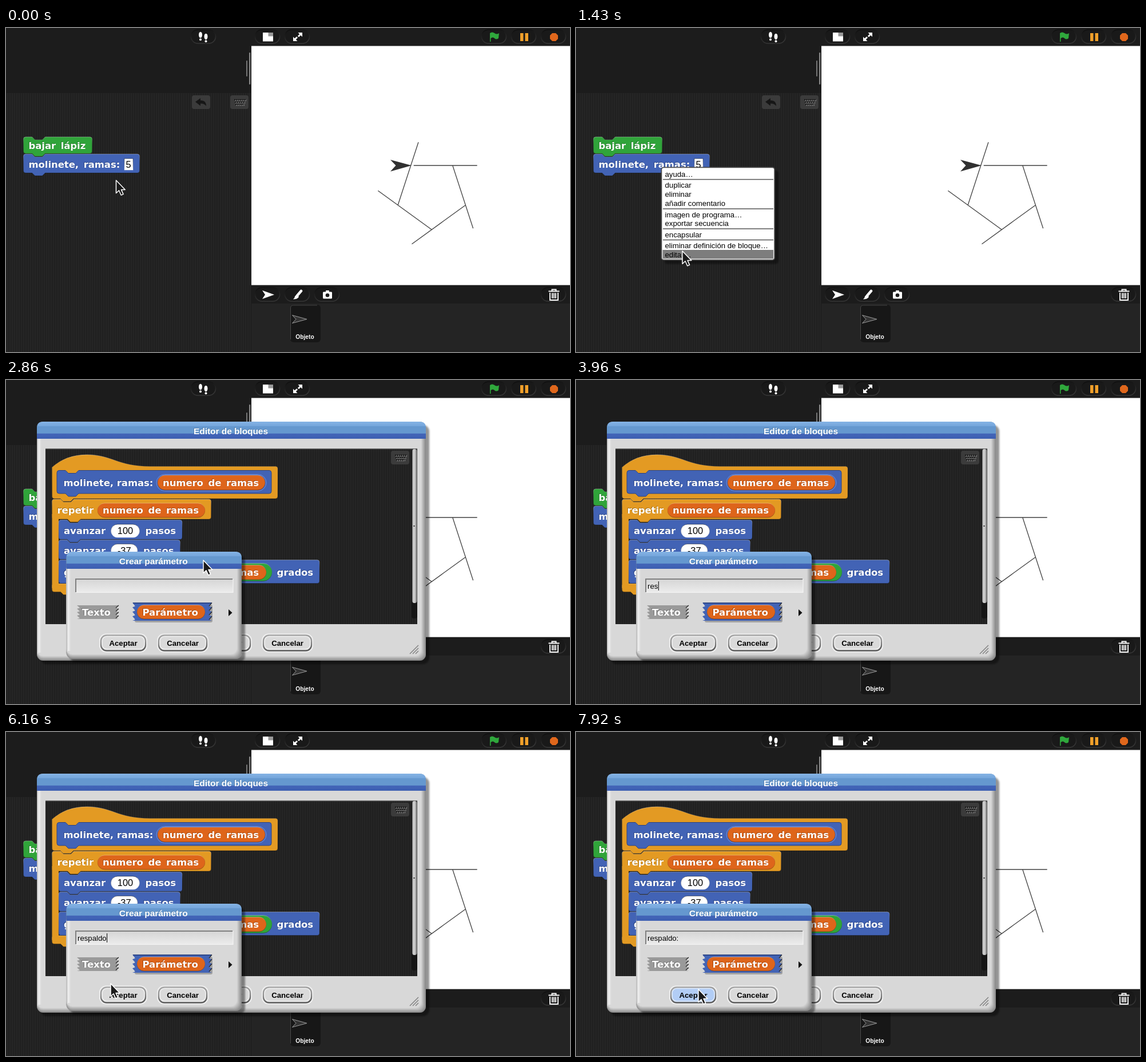
An HTML page for the animation above (8000 ms loop, 986 px wide and 568 px high).

```html
<!DOCTYPE html>
<html lang="es">
<head>
<meta charset="utf-8">
<title>Editor de bloques</title>
<style>
  html, body { margin: 0; width: 100%; height: 100%; overflow: hidden; background: #1c1c1c; }
  svg { display: block; }
  text { white-space: pre; }
  .label { font: bold 16.4px "DejaVu Sans", Verdana, sans-serif; fill: #fff; text-shadow: -1px -1px 0 rgba(0, 0, 0, .25); }
  .wide { word-spacing: 2.9px; }
  .num { font: 16.4px "Liberation Sans", Arial, sans-serif; fill: #000; text-anchor: middle; }
  .menu { font: 13.2px "Liberation Sans", Arial, sans-serif; fill: #000; }
  .button { font: bold 13.2px "Liberation Sans", Arial, sans-serif; fill: #000; text-anchor: middle; }
  .title { font: bold 15.4px "Liberation Sans", Arial, sans-serif; fill: #fff; text-anchor: middle; text-shadow: -1px -1px 0 rgba(0, 0, 0, .15); }
  .tiny { font: bold 10.2px "Liberation Sans", Arial, sans-serif; fill: #fff; text-anchor: middle; }
</style>
</head>
<body>
<svg id="stage" width="986" height="568" viewBox="0 0 986 568"></svg>
<script>
const BLUE = '#4263b5', GREEN = '#30a43a', GOLD = '#e39a23', ORANGE = '#de651b';
const STEP = 110, LOOP = 8000;

const rect = (x, y, w, h, fill, r = 0, more = '') =>
  `<rect x="${x}" y="${y}" width="${w}" height="${h}" rx="${r}" fill="${fill}" ${more}/>`;
const path = (d, fill = 'none', more = '') => `<path d="${d}" fill="${fill}" ${more}/>`;
const line = (d, color, width = 1, more = '') =>
  path(d, 'none', `stroke="${color}" stroke-width="${width}" ${more}`);
const text = (x, y, s, cls, more = '') => `<text x="${x}" y="${y}" class="${cls}" ${more}>${s}</text>`;
const edge = 'stroke="url(#edge)"';

const defs = `<defs>
  <pattern id="stripes" width="4" height="8" patternUnits="userSpaceOnUse">
    <rect width="4" height="8" fill="#252525"/><rect width="2" height="8" fill="#202020"/></pattern>
  <linearGradient id="edge" x2="0" y2="1"><stop stop-color="#fff" stop-opacity=".32"/>
    <stop offset=".5" stop-color="#000" stop-opacity=".08"/><stop offset="1" stop-color="#000" stop-opacity=".35"/></linearGradient>
  <linearGradient id="sunk" x2="0" y2="1"><stop stop-color="#000" stop-opacity=".45"/>
    <stop offset="1" stop-color="#fff" stop-opacity=".35"/></linearGradient>
  <linearGradient id="pill" x2=".25" y2="1"><stop stop-color="#0c0c0c"/>
    <stop offset=".5" stop-color="#202020"/><stop offset="1" stop-color="#363636"/></linearGradient>
  <linearGradient id="bar" x2="0" y2="1"><stop stop-color="#85b3e4"/><stop offset=".25" stop-color="#75a6dc"/>
    <stop offset=".26" stop-color="#6598cf"/><stop offset=".68" stop-color="#6598cf"/>
    <stop offset=".7" stop-color="#4365b8"/><stop offset="1" stop-color="#3d5fb2"/></linearGradient>
  <linearGradient id="rim"><stop stop-color="#b4b4b4"/><stop offset=".4" stop-color="#f0f0f0"/><stop offset="1" stop-color="#d8d8d8"/></linearGradient>
  <linearGradient id="ring" x2=".15" y2="1"><stop stop-color="#a6a6a6"/><stop offset=".5" stop-color="#909090"/>
    <stop offset="1" stop-color="#5c5c5c"/></linearGradient>
  <linearGradient id="field" x2="0" y2="1"><stop stop-color="#d4d4d4"/><stop offset="1" stop-color="#ececec"/></linearGradient>
  <linearGradient id="slider"><stop stop-color="#808080"/><stop offset=".35" stop-color="#dedede"/><stop offset="1" stop-color="#808080"/></linearGradient>
  <filter id="shade" x="-5%" y="-5%" width="112%" height="112%">
    <feDropShadow dx="6" dy="6" stdDeviation="1.6" flood-opacity=".42"/></filter>
</defs>`;

// Puzzle-shaped command block; dent and tab are offsets from the left side.
function blockPath(x, y, w, h, dent = 15, tab = 15) {
  const b = y + h, r = x + w;
  return `M${x} ${y + 4}q0 -4 4 -4H${x + dent}l5 5h13l5 -5H${r - 4}q4 0 4 4V${b - 4}q0 4 -4 4` +
    `H${x + tab + 23}l-5 5h-13l-5 -5H${x + 4}q-4 0 -4 -4Z`;
}
const block = (x, y, w, h, c, dent, tab) => path(blockPath(x, y, w, h, dent, tab), c, edge);
const oval = (x, y, w, h, c, more = edge) => rect(x, y, w, h, c, h / 2, more);
const number = (x, y, w, s) =>
  oval(x, y, w, 23, '#fff', 'stroke="url(#sunk)"') + text(x + w / 2, y + 17.3, s, 'num');
const variable = (x, y, w, h, s = 'numero de ramas') =>
  oval(x, y, w, h, ORANGE) + text(x + 9, y + h / 2 + 5.8, s, 'label wide');

const pillButton = (x, y) => rect(x - 21.5, y - 12, 43, 24, '#191919', 12, 'stroke="url(#pill)" stroke-width="1.6"');

function keyboard(x, y) {
  const row = (dx, dy, w, c) => line(`M${x + dx} ${y + dy}h${w}`, c, 2.4, 'stroke-dasharray="2.4 1.1"');
  const keys = (o, c) => row(-9 + o, -4 + o, 20, c) + row(-8 + o, o, 18, c) + row(-7 + o, 4 + o, 15, c);
  return rect(x - 16, y - 12, 32, 24, '#3b3b3b', 4) + keys(1, '#8c8c8c') + keys(0, '#171717');
}

function toolbar() {
  const foot = (x, y) => `<ellipse cx="${x}" cy="${y}" rx="3" ry="5.2" fill="#fff"/>` + rect(x - 2, y + 6.3, 4, 4, '#fff', 2);
  const gear = [[345, 15], [457, 15], [509, 15], [853, 15], [905, 15], [957, 15],
    [457, 467], [509, 467], [561, 467], [957, 467]].map(p => pillButton(...p)).join('');
  return gear + foot(340, 12) + foot(349.5, 15) +
    rect(449, 8, 18, 15.5, '#fff') + rect(458.5, 8, 8.5, 6.5, '#999') +
    path('M510.500 8H518V15.500L515.300 12.800L512 16L509.900 14L513.200 10.700ZM509.500 23H502V15.500L504.700 18.200L508 15L510.100 17L506.800 20.300Z', '#fff') +
    path('M846 9q4 -3 8 0t8 0l-1 9q-4 3 -7 0t-6.500 0v6h-1.500Z', '#2fa83c') +
    rect(899, 9, 5.5, 14, '#f1a02a') + rect(907.5, 9, 5.5, 14, '#f1a02a') +
    path('M955 9h6l4 4v6l-4 4h-6l-4 -4v-6Z', '#e0671c') +
    path('M448 460L469 467.500L448 475L453 467.500Z', '#fff') +
    line('M510 468L516 461', '#fff', 4.5, 'stroke-linecap="round"') +
    path('M508 467l4 4q-2 5 -10 4.500q3 -2 3 -5Z', '#fff') +
    rect(554, 462.5, 16, 12, '#fff', 1.5) + rect(559, 460, 6, 4, '#fff', 1) +
    '<circle cx="562" cy="468.500" r="3.300" fill="#1a1a1a"/>' +
    line('M948.500 461.500H967.500M954.500 461V458.500H961.500V461M951 464V477H965V464M955 464.500V474M958 464.500V474M961 464.500V474', '#fff', 1.9);
}

// Five branches of a pinwheel, each 116 long, stepping 63% forward.
function pinwheel() {
  let x = 707.7, y = 241, d = '';
  for (let i = 0; i < 5; i++) {
    const a = i * Math.PI * 2 / 5, dx = 116 * Math.cos(a), dy = 116 * Math.sin(a);
    d += `M${i ? x : x + 5} ${y}L${x + dx} ${y + dy}`;
    x += dx * .63;
    y += dy * .63;
  }
  return line(d, '#404040', 1.3) + path('M672 231L709 241L672 251.500L681.500 241Z', '#303030');
}

function desktop() {
  return rect(0, 0, 986, 568, '#1c1c1c') + rect(0, 114, 428, 454, 'url(#stripes)') +
    rect(429, 483, 557, 85, '#242424') + rect(429, 31.5, 557, 419.2, '#fff') +
    rect(425, 43, 2.2, 56, '#858585', 1) + rect(420, 57, 2, 28, '#777', 1) +
    toolbar() + pinwheel() +
    rect(325, 118, 32, 24, '#3b3b3b', 4) +
    path('M331 129.500L340 123V127Q350 126 350 137Q347 132 340 132.500V136.500Z', '#161616') + keyboard(408, 130) +
    rect(497, 485, 53, 66, '#171717', 6) + line('M497.500 546V491q0 -5 5 -5H544', '#484848') +
    path('M500.500 503.500L526 510.500L500.500 517.500L507 510.500Z', '#333', 'stroke="#aaa" stroke-width=".9"') +
    text(522.5, 545, 'Objeto', 'tiny') +
    block(30.5, 191, 120, 29, GREEN) + text(39.5, 212.3, 'bajar lápiz', 'label wide') +
    block(30.5, 221, 203, 33, BLUE) + text(39.5, 245, 'molinete, ramas:', 'label wide') +
    rect(207, 229, 15, 20, '#fff', 0, 'stroke="url(#sunk)"') + text(214, 245, '5', 'num');
}

function dialog(x, y, w, h, name) {
  const r = x + w;
  let bevel = '';
  for (let i = 1; i <= 8; i++) {
    const c = 139 + i * 77 / 8;
    bevel += rect(x, y + 20, w - i, h - 20 - i, `rgb(${c},${c},${c})`, 11);
  }
  return `<g filter="url(#shade)">` + rect(x, y, w, h, '#8b8b8b', 11) + '</g>' + bevel +
    rect(x, y + 28, 8, h - 42, 'url(#rim)') +
    path(`M${x} ${y + 30}V${y + 11}q0 -11 11 -11H${r - 11}q11 0 11 11V${y + 30}Z`, 'url(#bar)') +
    text(x + w / 2 - 1, y + 21.5, name, 'title');
}

function button(x, w, s, id = '') {
  return rect(x, 444.5, w, 33, '#f0f0f0', 12) +
    rect(x + 3, 447.5, w - 6, 27, '#dadada', 10, `stroke="url(#ring)" stroke-width="2.400" ${id && `id="${id}"`}`) +
    rect(x + 5, 449.5, w - 10, 22.5, 'none', 8, 'stroke="#fff" stroke-opacity=".600" stroke-width="1.600"') +
    text(x + w / 2, 465.7, s, 'button');
}

function editor() {
  const hat = 'M80.500 153Q105 131 141 131C185 131 195 151.500 252 151.500H471q4 0 4 4V204q0 4 -4 4H118l-5 5h-13l-5 -5H84.500q-4 0 -4 -4Z';
  const turn = line('M168 333A7.500 7.500 0 1 0 169.500 341', '#fff', 1.8) + path('M162 326L171.500 331.500L162.500 336Z', '#fff');
  const loop = line('M333 368H344Q348 368 348 364', '#fff', 3) + path('M342.500 364.500L349 357.500L355.500 364.500Z', '#fff');
  return dialog(54, 73, 680, 419, 'Editor de bloques') +
    rect(69, 120.5, 650, 307.5, 'url(#stripes)') + line('M69 121H719', '#555') + keyboard(689, 136) +
    rect(709, 122, 10, 296, '#151515', 4) + rect(710, 121, 8.5, 270, 'url(#slider)', 4) +
    rect(712.5, 255, 2, 2, '#333') +
    path(hat, GOLD, edge) +
    path(blockPath(89, 158.5, 375, 40.5), BLUE, 'stroke="#2c4380"') +
    text(100.5, 186, 'molinete, ramas:', 'label') +
    oval(263, 165.5, 192, 29, BLUE, 'stroke="#6f8fdb"') + variable(265, 167, 188, 26) +
    block(80.5, 209, 278, 35, GOLD, 15, 27) + block(80.5, 357, 278, 14.5, GOLD, 27, 15) + rect(80.5, 235, 11.5, 130, GOLD) +
    text(89.5, 234, 'repetir', 'label') + variable(160, 216, 188, 25) +
    block(92, 245.5, 216, 34, BLUE) + text(101, 270, 'avanzar', 'label') + number(183.5, 253, 50, '100') + text(243.5, 270, 'pasos', 'label') +
    block(92, 280.5, 212.5, 34, BLUE) + text(101, 305, 'avanzar', 'label') + number(183.5, 287.5, 46.5, '-37') + text(240, 305, 'pasos', 'label') +
    block(92, 315.5, 456, 41, BLUE) + text(101, 343, 'girar', 'label') + turn +
    oval(177, 321.5, 288, 31, GREEN) + number(187, 325.5, 50, '360') + text(249, 343, '/', 'label') +
    variable(265, 324.5, 190, 25.5) + text(473.5, 343, 'grados', 'label') + loop +
    button(250, 84, 'Aceptar') + button(350, 80, 'Aplicar') + button(447, 90, 'Cancelar') +
    line('M706 480L721 465M711 480L721 470M716 480L721 475', '#7d7d7d', 1.4);
}

// Label fragment with saw-toothed sides.
function fragment(x, y, w, h, c) {
  const n = 4, s = h / n;
  let d = `M${x} ${y}H${x + w}`, teeth = '';
  for (let i = 0; i < n; i++) {
    d += `l-5 ${s * .75}L${x + w} ${y + (i + 1) * s}`;
    teeth += `M${x + w} ${y + i * s}l-5 ${s * .75}`;
  }
  d += `H${x}`;
  for (let i = n; i-- > 0;) d += `L${x + 5} ${y + (i + .75) * s}L${x} ${y + i * s}`;
  return path(d + 'Z', c) + line(teeth, '#222', 1.2);
}

function inputDialog() {
  return dialog(105.5, 301, 306.5, 188, 'Crear parámetro') +
    rect(121, 348, 276, 24.5, 'url(#field)') + line('M122 372V349H396', '#808080', 2) + line('M122 372.500H397V349', '#f4f4f4', 1.2) +
    text(125, 366, '', 'menu', 'id="entry"') + rect(176, 353, 1, 16, '#000', 0, 'id="caret"') +
    fragment(124, 395, 73, 24, '#9a9a9a') + text(133, 412.5, 'Texto', 'label') +
    rect(225, 394, 136, 31, '#000', 3, 'opacity=".250"') + fragment(221, 390.5, 139, 31.5, BLUE) + line('M222 391H359', '#223a78', 1.4) +
    oval(229, 394.5, 119, 24.5, ORANGE) + text(238.5, 412.5, 'Parámetro', 'label') +
    path('M389 402L395.500 408L389 414Z', '#111') +
    button(163, 84, 'Aceptar', 'accept') + button(264, 90, 'Cancelar');
}

const ITEMS = [['ayuda…', 261], ['duplicar', 280], ['eliminar', 296], ['añadir comentario', 312],
  ['imagen de programa…', 332], ['exportar secuencia', 347], ['encapsular', 367],
  ['eliminar definición de bloque…', 386], ['editar…', 402]];

function menu() {
  return `<g filter="url(#shade)">` + rect(148.5, 243.5, 199.5, 164, '#4d4d4d', 5) + '</g>' +
    rect(150.3, 245.3, 195.9, 160.4, '#fff', 3) + rect(151.5, 389, 193.5, 15.5, '#7d7d7d', 0, 'id="hover"') +
    line('M152 265.500H345M152 317H345M152 352H345M152 371.500H345', '#555', 1.3) +
    ITEMS.map(([s, y]) => text(155.5, y, s, 'menu')).join('');
}

const svg = document.getElementById('stage');
svg.innerHTML = defs + desktop() +
  `<g id="menu">${menu()}</g><g id="editor">${editor()}</g><g id="input">${inputDialog()}</g>` +
  path('M0 0V22.500L5 17.800L8.700 26L12.600 24.400L9 16.400H15.800Z', '#1b1b1b',
    'id="pointer" stroke="#fff" stroke-width="1.500" stroke-linejoin="round"');

const get = id => document.getElementById(id);
const show = (id, on) => get(id).setAttribute('visibility', on ? 'visible' : 'hidden');

// Pointer stops: time, x, y. It rests hidden while keys are typed.
const STOPS = [[0, 192.5, 267], [220, 149, 245], [880, 149, 245], [1430, 186, 391], [1539, 186, 391],
  [1540, 498.5, 281], [1760, 498.5, 281], [2310, 458, 182], [2530, 458, 182], [2860, 345, 316],
  [5500, 345, 316], [6160, 183, 441], [7370, 183, 441], [7810, 214, 451], [8000, 214, 451]];
const HIDDEN = [[3410, 5500], [6600, 7370]];
const WORD = 'respaldo';

function pointerAt(t) {
  const i = Math.max(1, STOPS.findIndex(s => s[0] >= t));
  const [t0, x0, y0] = STOPS[i - 1], [t1, x1, y1] = STOPS[i];
  const k = (t - t0) / (t1 - t0), e = k * k * (3 - 2 * k);
  return [x0 + (x1 - x0) * e, y0 + (y1 - y0) * e];
}

function draw(t) {
  const [x, y] = pointerAt(t);
  const visible = !HIDDEN.some(([a, b]) => t >= a && t < b);
  get('pointer').setAttribute('transform', `translate(${x} ${y})`);
  show('pointer', visible);

  show('menu', t >= 880 && t < 1540);
  const item = ITEMS.find(m => y >= m[1] - 13 && y < m[1] + 3);
  show('hover', t >= 880 && t < 1540 && item);
  if (item) get('hover').setAttribute('y', item[1] - 13);

  const open = t >= 2640;
  show('editor', t >= 1540);
  show('input', open);
  const typed = Math.max(0, Math.min(WORD.length, Math.floor((t - 3410) / 165)));
  const entry = get('entry');
  entry.textContent = WORD.slice(0, typed) + (t >= 6710 ? ':' : '');
  get('caret').setAttribute('x', 125.5 + (typed ? entry.getComputedTextLength() : 0));
  show('caret', open && (t + 150) % 1200 < 600);

  const over = open && visible && x > 163 && x < 247 && y > 445 && y < 477;
  get('accept').setAttribute('fill', over ? '#b2cdf5' : '#dadada');
}

function tick() {
  let t = Math.floor(performance.now() % LOOP / STEP) * STEP;
  if (t < 880) t = t < 220 ? 0 : 220;
  draw(t);
  requestAnimationFrame(tick);
}
tick();
</script>
</body>
</html>
```
